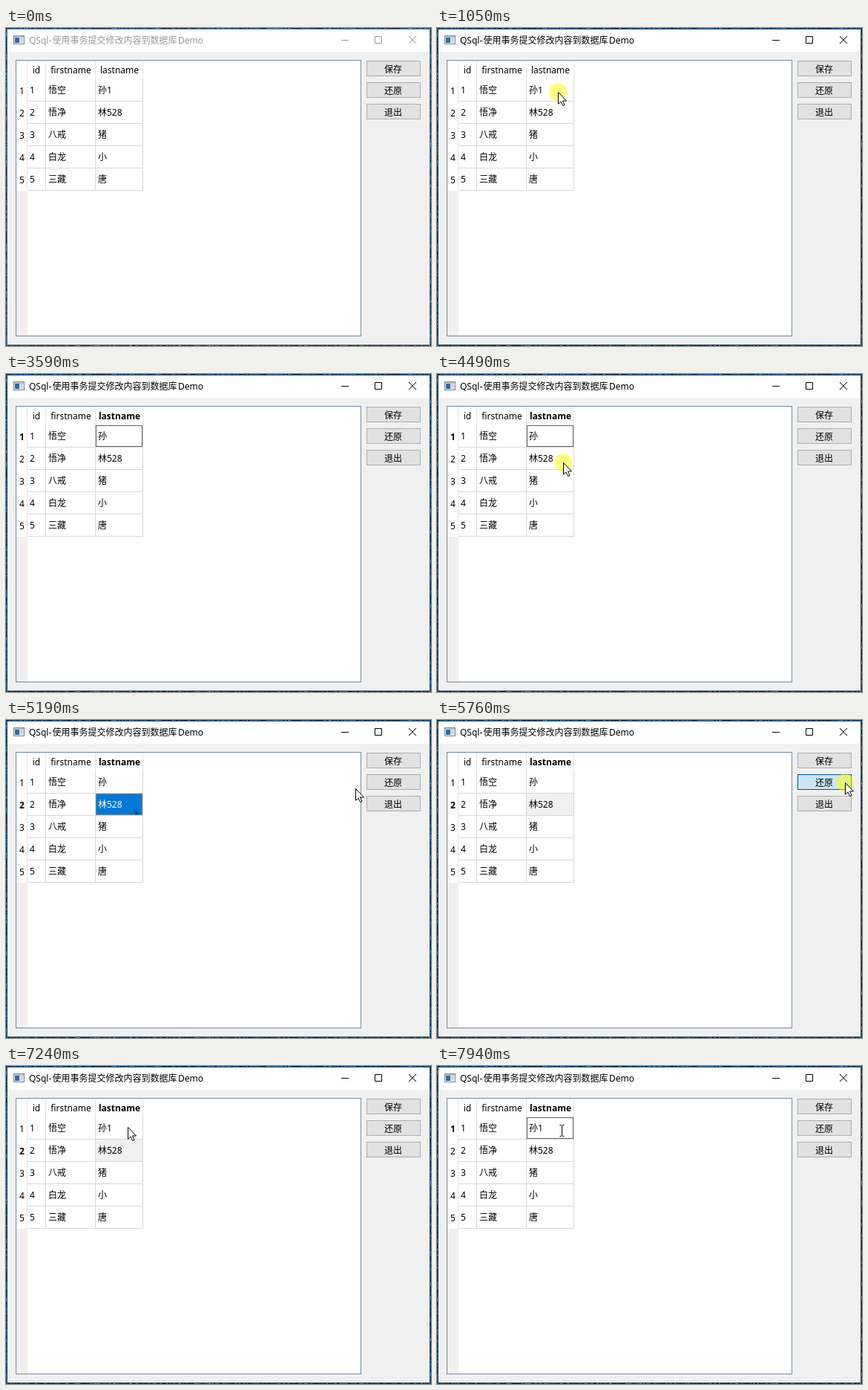
Recreate the animation shown at these times as an HTML page. Size 573 px wide and 428 px high, loop 8000 ms.

```html
<!DOCTYPE html>
<html lang="zh-CN">
<head>
<meta charset="utf-8">
<title>QSql Demo</title>
<style>
  html, body { margin: 0; width: 100%; height: 100%; overflow: hidden; }
  svg { display: block; width: 573px; height: 428px; }
  text { font: 12px "Noto Sans", "Noto Sans CJK SC", "Noto Sans CJK", sans-serif; white-space: pre; }
  .bold { font-weight: 700; }
  .mid { text-anchor: middle; }
</style>
</head>
<body>
<svg id="stage" viewBox="0 0 573 428" xmlns="http://www.w3.org/2000/svg"></svg>
<script>
const LOOP = 8000;
const stage = document.getElementById('stage');

function add(tag, attrs = {}, content = '', parent = stage) {
  const el = document.createElementNS('http://www.w3.org/2000/svg', tag);
  for (const key in attrs) el.setAttribute(key, attrs[key]);
  el.textContent = content;
  parent.appendChild(el);
  return el;
}
const set = (el, key, value) => el.setAttribute(key, value);
const show = (el, on) => set(el, 'visibility', on ? 'visible' : 'hidden');
const rect = (x, y, width, height, fill, extra = {}) =>
  add('rect', { x, y, width, height, fill, ...extra });
const frame = (x, y, w, h, stroke, fill = 'none', extra = {}) =>
  rect(x + .5, y + .5, w - 1, h - 1, fill, { stroke, ...extra });
const label = (x, y, content, cls = '') => add('text', { x, y, class: cls, fill: '#000' }, content);

// Desktop slivers around the window
rect(0, 0, 573, 428, '#1d405f');
let seed = 7;
const random = () => (seed = seed * 16807 % 2147483647) / 2147483647;
const speckle = () => `hsl(209 48% ${12 + 45 * random() ** 2}%)`;
for (let x = 0; x < 573; x += 2) {
  rect(x, 0, 2, 1, speckle());
  rect(x, 427, 2, 1, speckle());
}
for (let y = 0; y < 428; y += 2) {
  rect(0, y, 1, 2, speckle());
  rect(572, y, 1, 2, speckle());
}

// Window and title bar
rect(2, 1, 569, 31, '#fff');
rect(2, 32, 569, 394, '#f0f0f0');
const edge = frame(1, 1, 571, 426, '#5f7889');
frame(10, 10, 15, 12, '#7b8793', '#e6ebf0');
rect(11, 11, 13, 2, '#b9c5d1');
rect(12, 13, 6, 7, '#3a669a');
rect(19, 13, 4, 7, '#cfd8e1');
const title = label(31, 21, '');
add('tspan', {}, 'QSql-', title);
add('tspan', { x: 62.5 }, '使用事务提交修改内容到数据库', title);
add('tspan', { x: 232 }, 'Demo', title);
const controls = add('path', {
  d: 'M452 16.5H462M497.5 11.5h9v9h-9zM543 11l10 10M553 11l-10 10', fill: 'none'
});

// Table
frame(13, 43, 466, 372, '#7089a3', '#fff');
rect(14, 219, 15, 195, '#f0f0f0');
const headerHover = rect(121, 44, 63, 25, '#d9ebf9');
add('path', { d: 'M28.5 44V218M53.5 44V69M120.5 44V69M184.5 44V69', stroke: '#e5e5e5' });
add('path', {
  d: 'M53.5 69V218M120.5 69V218M184.5 69V219M29 98.5H184M29 128.5H184M29 158.5H184M29 188.5H184M29 218.5H184',
  stroke: '#d8d8d8'
});
label(41, 61, 'id', 'mid');
label(87.5, 61, 'firstname', 'mid');
const lastHeader = label(153, 61, 'lastname', 'mid');

const cells = [0, 1].map(i => {
  const y = 69 + 30 * i;
  return {
    fill: rect(121, y, 63, 29, '#fff'),
    focus: frame(121, y, 63, 29, '#ff8728', 'none', { 'stroke-dasharray': '1 1' })
  };
});
const ghost = add('path', { d: 'M172 118l9 8h-4l2 2h-4l-3-3z', fill: '#00589f', opacity: .75 });
const editor = frame(121, 69, 63, 29, '#646464', '#fff');
const textMark = rect(124, 75, 19, 17, '#0078d7');

const people = [['悟空', '孙1'], ['悟净', '林528'], ['八戒', '猪'], ['白龙', '小'], ['三藏', '唐']];
const rows = people.map(([first, last], i) => {
  const y = 88 + 30 * i;
  label(32, y, i + 1);
  label(57, y, first);
  return { number: label(21.5, y + 1, i + 1, 'mid'), last: label(124, y, last) };
});
const caret = rect(143, 75, 1, 17, '#000');

// Buttons
const buttons = ['保存', '还原', '退出'].map((name, i) => {
  const y = 44 + 29 * i;
  const box = frame(486, y, 73, 21, '#adadad', '#e1e1e1');
  label(522, y + 16, name, 'mid');
  return { box, y };
});

// Pointer
const halo = add('circle', { r: 12, fill: '#ff0', opacity: .5 });
const arrow = add('path', {
  d: 'M.5 .5V16.3L4 13 6.6 18.5 9 17.5 6.5 12H11.5Z', fill: '#fff', stroke: '#000'
});
const beam = add('path', {
  d: 'M-3 -7.5H-1L0 -6.5 1 -7.5H3M0 -7V7M-3 7.5H-1L0 6.5 1 7.5H3', fill: 'none', stroke: '#000'
});

const route = [
  [50, 415, 391], [800, 163, 86], [3960, 163, 86], [4290, 170, 119], [4690, 170, 119],
  [5190, 470, 92], [5260, 524, 85], [5310, 535, 84], [5450, 550, 84], [6090, 550, 84],
  [6150, 547, 90], [6280, 533, 84], [6450, 330, 45], [6640, 116, 28], [6850, 150, 56],
  [7100, 150, 56], [7260, 166, 86], [LOOP, 166, 86]
];
const presses = [
  [1050, 1180], [1230, 1290], [1740, 1860], [4490, 4620],
  [5650, 5950], [7300, 7370], [7430, 7560], [7700, 7940]
];
const during = (t, ...spans) => spans.some(([from, to]) => t >= from && t < to);

function pointerAt(t) {
  const i = Math.max(1, route.findIndex(([time]) => time > t));
  const [t0, x0, y0] = route[i - 1], [t1, x1, y1] = route[i];
  const k = Math.max(0, (t - t0) / (t1 - t0));
  return [Math.round(x0 + (x1 - x0) * k), Math.round(y0 + (y1 - y0) * k)];
}

function paintCell(i, blue, gray) {
  set(cells[i].fill, 'fill', blue ? '#0078d7' : gray ? '#f0f0f0' : '#fff');
  show(cells[i].focus, blue);
}

function render(t) {
  const active = t >= 1050;
  const [x, y] = pointerAt(t);
  const pressed = during(t, ...presses);
  const editing = during(t, [1230, 4550], [7430, LOOP]);
  const marked = during(t, [1230, 1740], [7430, 7700]);
  const firstBlue = during(t, [1120, 1230], [7300, 7430]);
  const secondBlue = during(t, [4550, 5650]);
  const erased = during(t, [2800, 5900]);

  set(title, 'fill', active ? '#000' : '#999');
  set(controls, 'stroke', active ? '#000' : '#999');
  set(edge, 'stroke', active ? '#24506f' : '#5f7889');

  set(lastHeader, 'class', t >= 1120 ? 'mid bold' : 'mid');
  show(headerHover, x > 120 && x < 185 && y >= 44 && y < 69);
  set(rows[0].number, 'class', during(t, [1120, 4550], [7300, LOOP]) ? 'mid bold' : 'mid');
  set(rows[1].number, 'class', during(t, [4550, 7300]) ? 'mid bold' : 'mid');

  paintCell(0, firstBlue, false);
  paintCell(1, secondBlue, during(t, [5650, 7300]));
  show(ghost, during(t, [4690, 5650]));
  show(editor, editing);
  show(textMark, marked);
  rows[0].last.textContent = erased ? '孙' : '孙1';
  set(rows[0].last, 'fill', firstBlue || marked ? '#fff' : '#000');
  set(rows[1].last, 'fill', secondBlue ? '#fff' : '#000');
  show(caret, during(t, [2240, 3410], [3960, 4490]));
  set(caret, 'x', erased ? 136 : 143);

  for (const button of buttons) {
    const hover = x >= 486 && x < 559 && y >= button.y && y < button.y + 21;
    const down = hover && pressed;
    set(button.box, 'fill', down ? '#cce4f7' : hover ? '#e5f1fb' : '#e1e1e1');
    set(button.box, 'stroke', down ? '#005499' : hover ? '#0078d7' : '#adadad');
  }

  const visible = t >= 50 && !during(t, [3590, 3960]);
  const overEditor = editing && x > 120 && x < 185 && y >= 69 && y < 98;
  show(halo, pressed);
  show(arrow, visible && !overEditor);
  show(beam, visible && overEditor);
  set(halo, 'transform', `translate(${x} ${y})`);
  set(arrow, 'transform', `translate(${x} ${y})`);
  set(beam, 'transform', `translate(${x + 2.5} ${y + 1})`);
}

const start = performance.now();
function tick() {
  render((performance.now() - start) % LOOP);
  requestAnimationFrame(tick);
}
tick();
</script>
</body>
</html>
```
